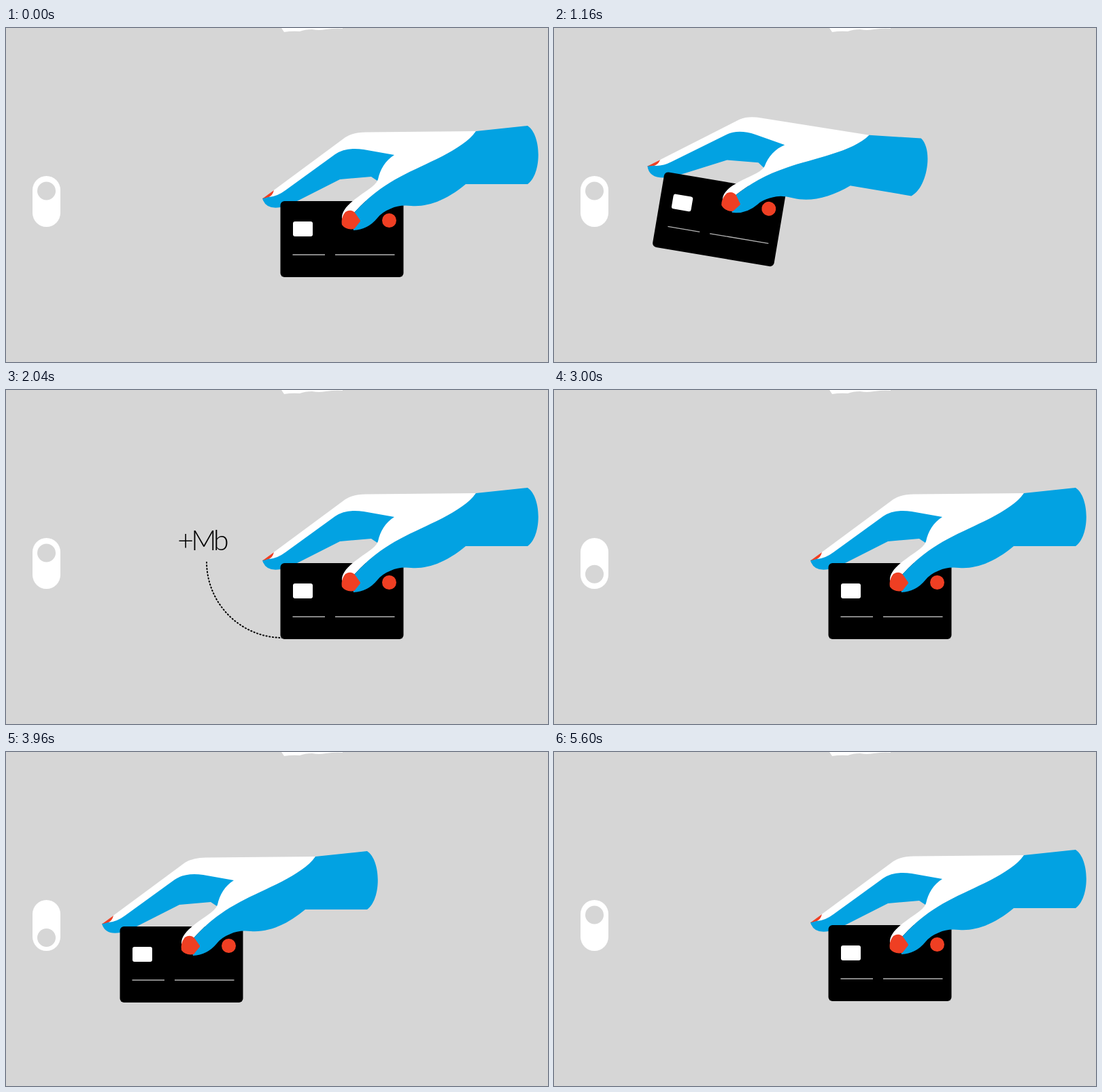
An HTML page for the animation above (5640 ms loop, 797x492 px).

```html
<!DOCTYPE html>
<html lang="en">
<head>
<meta charset="utf-8">
<title>Card swipe</title>
<style>
html, body { margin: 0; width: 100%; height: 100%; overflow: hidden; background: #d6d6d6; }
svg { display: block; }
text { font-family: Lato, sans-serif; text-anchor: middle; }
.blue { fill: #02a2e2; }
.white { fill: #fff; }
.red { fill: #ef3f23; }
.line { fill: none; stroke: #000; stroke-width: 2.3; }
</style>
</head>
<body>
<svg width="797" height="492" viewBox="0 0 797 492">
  <rect width="797" height="492" fill="#d6d6d6"/>
  <path class="white" d="M405 0L409 6Q420 4 432 5Q440 2 450 2Q460 4 470 2Q485 0 495 1V0Z"/>

  <rect class="white" x="39" y="218" width="41" height="75" rx="20.5"/>
  <circle id="knob" cx="59.5" cy="240" r="13.5" fill="#d6d6d6"/>

  <path id="trail" class="line" style="stroke-width:2" stroke-linecap="round" stroke-dasharray="1.2 3.5"/>
  <text id="data" x="288" y="236" font-size="41" font-weight="300" letter-spacing="-4">+Mb</text>
  <g id="cash">
    <g id="arrow" class="line">
      <path d="M293.5 244A27.5 27.5 0 0 1 282 191.5"/>
      <path d="M274 190.5L282.5 191L280 199"/>
    </g>
    <use href="#arrow" transform="rotate(180 293.5 216.5)"/>
    <text x="287.5" y="228" font-size="28" letter-spacing="-3" fill="#000">R$</text>
  </g>

  <g id="hand">
    <path class="blue" d="M377 251L392 245L484 182L520 174L573 184L549 227L537 219L491 223L430 254Q414 262 404 264Q382 268 377 251Z"/>
    <rect x="403.5" y="255" width="181" height="112" rx="6"/>
    <rect class="white" x="422" y="285" width="29" height="22" rx="3"/>
    <path d="M421.5 334H469M484 334H571.5" stroke="#b4b4b4" stroke-width="1.4"/>
    <circle class="red" cx="563.5" cy="283.5" r="10.5"/>
    <path class="white" d="M391 241L499 161Q511 153.500 530 153.500L691 152C672 180 615 200 580 219C550 235 530 252 512 272L494 281C493 268 505 257 530 240Q545 230 547 223C550 208 558 195 571 187L526 179Q500 175 484 186L411 239Q399 248 387 249Z"/>
    <path class="blue" d="M691 152L767 144C788 158 788 215 767 230H676C650 252 622 264 596 262Q578 260 566 266Q553 271 546 280Q532 297 511 298L508 285L512 272C530 252 550 235 580 219C615 200 672 180 691 152Z"/>
    <path class="red" d="M377 251.500L394 239Q392 247 386 249Z"/>
    <path class="red" d="M499 271Q507 266 513 272L520 282Q522 284 520 286L512 296Q500 298 494 290Q492 280 499 271Z"/>
  </g>
</svg>
<script>
const LOOP = 5640, SECOND = 2500;
const $ = id => document.getElementById(id);
const ease = u => u < .5 ? 2 * u * u : 1 - 2 * (1 - u) ** 2;

// keys: time, value pairs with eased steps between them
function at(t, keys) {
  if (t <= keys[0]) return keys[1];
  for (let i = 2; i < keys.length; i += 2) {
    if (t < keys[i]) {
      const u = (t - keys[i - 2]) / (keys[i] - keys[i - 2]);
      return keys[i - 1] + (keys[i + 1] - keys[i - 1]) * ease(u);
    }
  }
  return keys[keys.length - 1];
}

const handX = [520, 0, 975, -242, 1160, -235, 1360, -237, 1439, -237, 1917, 0];
const handY = [520, 0, 860, 6, 1160, -1, 1366, 2, 1500, 2, 1917, 0];
const tilt = [520, 0, 940, 20.7, 1366, 0];
const reveal = [1640, 0, 2000, 1, 2270, 1, 2630, 0];
const fade = [1640, 0, 1900, 1, 2270, 1, 2530, 0];
const knobY = [2740, 240, 3060, 273.5, 5240, 273.5, 5560, 240];

function frame() {
  const t = performance.now() % LOOP;
  const swipe = t < SECOND ? t : t - SECOND;

  $('hand').setAttribute('transform',
    `translate(${at(swipe, handX)} ${at(swipe, handY)}) rotate(${at(swipe, tilt)} 654 200)`);
  $('knob').setAttribute('cy', at(t, knobY));
  $('data').setAttribute('opacity', at(t, fade));
  $('cash').setAttribute('opacity', at(t - SECOND, fade));

  const shown = Math.max(at(t, reveal), at(t - SECOND, reveal));
  const a = shown * Math.PI / 2;
  $('trail').setAttribute('d', shown
    ? `M407 365A112 112 0 0 1 ${407 - 112 * Math.sin(a)} ${253 + 112 * Math.cos(a)}` : '');

  requestAnimationFrame(frame);
}
frame();
</script>
</body>
</html>
```
